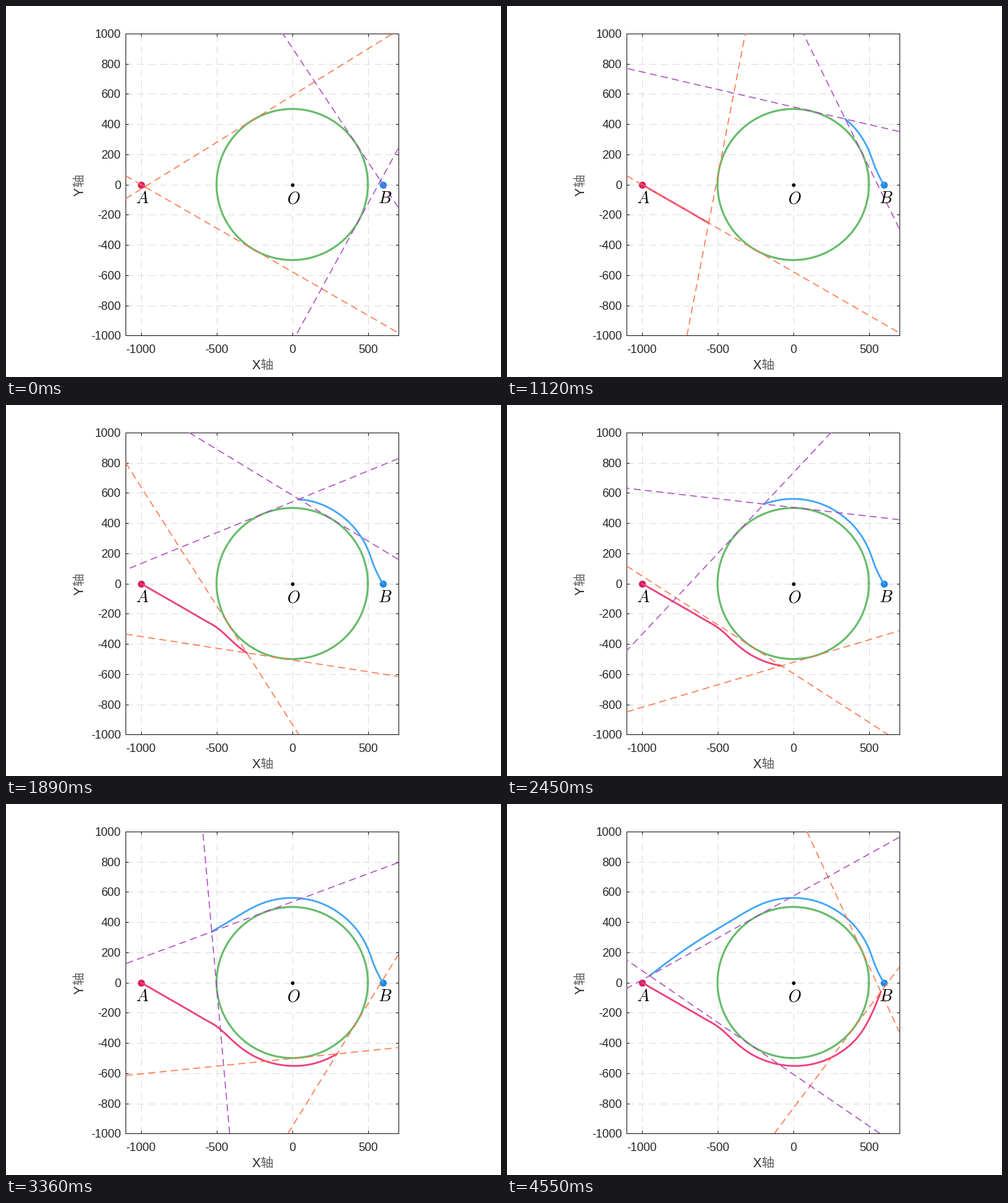
Write a matplotlib script that moves like this. It is 700 by 525 pixels and loops after 4620 ms.

```python
import numpy as np
import matplotlib.pyplot as plt
from matplotlib.animation import FuncAnimation

W, H, DPI = 700, 525, 100
FRAMES, INTERVAL = 66, 70
STEP = 30            # distance travelled per frame
RADIUS = 500
X_LIM, Y_LIM = (-1100, 700), (-1000, 1000)
LEFT, TOP, WIDTH, HEIGHT = 169.3, 38.8, 385.3, 427.6   # plot box in pixels
INK, GREY = "#262626", "#606060"
DASH = (0, (7.2, 4.32))

plt.rcParams.update({
    "font.family": ["Liberation Sans", "Noto Sans CJK JP"],
    "font.size": 12,
    "mathtext.fontset": "cm",
    "axes.unicode_minus": False,
    "lines.scale_dashes": False,
    "lines.dash_capstyle": "butt",
})


def polar(angle, r):
    a = np.radians(angle)
    return r * np.cos(a), r * np.sin(a)


def spline(s, knots, values):
    """Natural cubic spline through the knots, evaluated at s."""
    h = np.diff(knots)[:, None]
    slope = np.diff(values, axis=0) / h
    n = len(knots)
    system, rhs = np.eye(n), np.zeros((n, 2))
    for k in range(1, n - 1):
        system[k, k - 1:k + 2] = h[k - 1, 0], 2 * (h[k - 1, 0] + h[k, 0]), h[k, 0]
        rhs[k] = 6 * (slope[k] - slope[k - 1])
    m = np.linalg.solve(system, rhs)
    k = np.clip(np.searchsorted(knots, s, side="right") - 1, 0, n - 2)
    t = (s - knots[k])[:, None]
    b = slope[k] - h[k] * (2 * m[k] + m[k + 1]) / 6
    return values[k] + t * (b + t * (m[k] / 2 + t * (m[k + 1] - m[k]) / (6 * h[k])))


def route(waypoints):
    """Positions at equal steps along (distance, point) waypoints."""
    knots = np.array([w[0] for w in waypoints], float)
    points = np.array([w[1] for w in waypoints], float)
    return spline(STEP * np.arange(FRAMES + 1.0), knots, points)


def along_tangent(s):
    return -1000 + s * np.cos(np.pi / 6), -s / 2


red_route = route(
    [(s, along_tangent(s)) for s in (0, 200, 400, 510, 560)] + [
        (712, (-400, -379)),
        (840, polar(236.8, 548.8)),
        (1080, polar(261.87, 550.5)),
        (1290, polar(283.66, 555)),
        (1470, polar(302.1, 557.5)),
        (1650, polar(320.5, 558.9)),
        (1770, polar(333, 557)),
        (1980, (578.8, -61.7)),
    ])
blue_route = route([
    (0, (600, 0)),
    (30, (583.4, 25)),
    (60, (569.5, 51.6)),
    (120, (544, 106)),
    (197, (517.5, 178.5)),
    (253, (497, 230.5)),
    (380, polar(38.2, 551)),
    (510, polar(51.55, 553.4)),
    (675, polar(68.5, 558)),
    (840, polar(85.47, 560)),
    (1080, polar(110.17, 560)),
    (1150, polar(117.4, 560)),
    (1290, (-378.2, 428)),
    (1650, (-683.6, 239.7)),
    (1980, (-949, 44.8)),
])


def tangent(point, side, heading):
    """Tangent through point, cut to the plot box and drawn along heading."""
    x, y = point
    phi = np.arctan2(y, x) + side * np.arccos(RADIUS / np.hypot(x, y))
    foot = RADIUS * np.array([np.cos(phi), np.sin(phi)])
    along = np.array([-np.sin(phi), np.cos(phi)])
    spans = [sorted((edge - foot[i]) / along[i] for edge in lim)
             for i, lim in enumerate((X_LIM, Y_LIM))]
    start = max(span[0] for span in spans)
    end = min(span[1] for span in spans)
    ends = sorted((foot + t * along for t in (start, end)),
                  key=lambda p: heading * p[0])
    return np.transpose(ends)


fig = plt.figure(figsize=(W / DPI, H / DPI), dpi=DPI, facecolor="white")
ax = fig.add_axes([LEFT / W, 1 - (TOP + HEIGHT) / H, WIDTH / W, HEIGHT / H])
ax.set(xlim=X_LIM, ylim=Y_LIM,
       xticks=range(-1000, 501, 500), yticks=range(-1000, 1001, 200))
ax.tick_params(direction="in", top=True, right=True, length=3.1, width=0.72,
               color=INK, labelcolor=INK)
ax.tick_params(axis="x", pad=9.2)
ax.tick_params(axis="y", pad=5)
ax.set_axisbelow(True)
ax.grid(color="#dedede", linewidth=0.72, linestyle=DASH)
for spine in ax.spines.values():
    spine.set(color=INK, linewidth=0.72)


def label(x, y, text, color, rotation=0):
    fig.text(x / W, 1 - y / H, text, fontsize=13.2, color=color,
             rotation=rotation, ha="center", va="center")


label(354, 509.5, "X", INK)
label(368.5, 509.5, "轴", GREY)
label(105, 262.5, "Y", INK, 90)
label(105, 247, "轴", GREY, 90)

theta = np.linspace(0, 2 * np.pi, 361)
ax.plot(RADIUS * np.cos(theta), RADIUS * np.sin(theta),
        color="#66bb6a", linewidth=2, zorder=2)
for x, name, color, size in ((-1000, "A", "#d81b60", 7.2),
                             (0, "O", "black", 3.7),
                             (600, "B", "#1e88e5", 7.2)):
    ax.plot(x, 0, "o", color=color, markersize=size, markeredgewidth=0, zorder=3)
    ax.text(x - 34, -125, f"${name}$", fontsize=17, color="black",
            ha="left", va="baseline", zorder=6)


def traveller(path, heading, path_color, tangent_color):
    trail, = ax.plot([], [], color=path_color, linewidth=1.8, zorder=4)
    sights = [ax.plot([], [], color=tangent_color, linewidth=1,
                      linestyle=DASH, zorder=5)[0] for _ in range(2)]
    return path, heading, trail, sights


travellers = [traveller(red_route, 1, "#ec407a", "#ff7043"),
              traveller(blue_route, -1, "#42a5f5", "#ab47bc")]


def draw(frame):
    for path, heading, trail, sights in travellers:
        trail.set_data(*path[:frame + 2].T)
        for side, sight in zip((-1, 1), sights):
            sight.set_data(*tangent(path[frame + 1], side, heading))
    return []


anim = FuncAnimation(fig, draw, frames=FRAMES, interval=INTERVAL,
                     repeat=True, repeat_delay=0)
plt.show()
```
